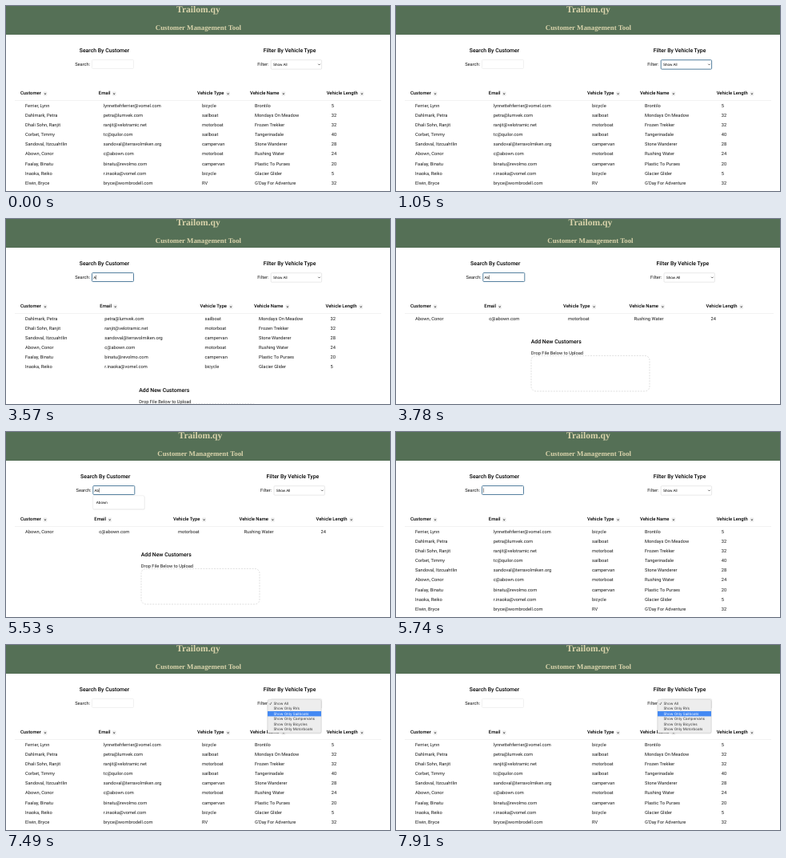
Animation, 480 px wide and 232 px high, one loop 8000 ms. Source, as an HTML page:

```html
<!DOCTYPE html>
<html lang="en">
<head>
<meta charset="utf-8">
<title>Customer Management Tool</title>
<style>
  html, body { margin: 0; width: 100%; height: 100%; overflow: hidden; background: #fff; }
  svg { display: block; width: 480px; height: 232px; }
  text { font-family: Roboto, sans-serif; font-size: 5.72px; fill: #1a1a1a; text-rendering: geometricPrecision; white-space: pre; }
  .serif { font-family: "Liberation Serif", serif; font-weight: 700; fill: #d9d3ab; text-anchor: middle; }
  .brand { font-size: 11.55px; }
  .tagline { font-size: 8.84px; }
  .head { font-size: 6.86px; font-weight: 500; fill: #000; }
  .col { font-size: 5.9px; font-weight: 500; fill: #000; }
  .ui { font-family: "Liberation Sans", sans-serif; font-size: 4.6px; fill: #000; }
  .menu { font-family: Inter, sans-serif; font-size: 4.55px; fill: #333; }
  .menu.on { fill: #fff; }
</style>
</head>
<body>
<svg id="stage" viewBox="0 0 480 232" xmlns="http://www.w3.org/2000/svg"></svg>
<script>
const LOOP = 8000;
const RING = 'stroke="#55809f" stroke-width="1"';
const stage = document.getElementById('stage');

const customers = [
  ['Ferrier, Lynn', 'lynnettehferrier@vomel.com', 'bicycle', 'Brontilo', 5],
  ['Dahlmark, Petra', 'petra@lumvek.com', 'sailboat', 'Mondays On Meadow', 32],
  ['Dhali Sohn, Ranjit', 'ranjit@velotramic.net', 'motorboat', 'Frozen Trekker', 32],
  ['Corbet, Timmy', 'tc@quilor.com', 'sailboat', 'Tangerinadale', 40],
  ['Sandoval, Itzcuahtlin', 'sandoval@terravolmiken.org', 'campervan', 'Stone Wanderer', 28],
  ['Abown, Conor', 'c@abown.com', 'motorboat', 'Rushing Water', 24],
  ['Faalay, Binatu', 'binatu@revolmo.com', 'campervan', 'Plastic To Purses', 20],
  ['Inaoka, Reiko', 'r.inaoka@vomel.com', 'bicycle', 'Glacier Glider', 5],
  ['Elwin, Bryce', 'bryce@wombrodell.com', 'RV', "G'Day For Adventure", 32]
];
const titles = ['Customer', 'Email', 'Vehicle Type', 'Vehicle Name', 'Vehicle Length'];
const sortX = [31, 19.4, 38.6, 41.9, 44.2];
const options = ['Show All', 'Show Only RVs', 'Show Only Sailboats',
  'Show Only Campervans', 'Show Only Bicycles', 'Show Only Motorboats'];

// Column positions widen or shrink with the longest visible entries
const layouts = {
  full: [18, 115.8, 239, 305, 400.7],
  some: [18, 117.3, 242.5, 310, 399.5],
  one: [18, 110.3, 209, 291.5, 387.5]
};

// Each entry holds from its time on
const typed = [[0, ''], [3570, 'A'], [3780, 'Ab'], [4060, 'Abo'], [4130, 'Abow'],
  [5180, 'Abo'], [5530, 'Ab'], [5600, '']];
const caret = [[0, 0], [2870, 1], [3360, 0], [3570, 1], [4690, 0], [5180, 1],
  [5600, 0], [5740, 1], [6230, 0], [6790, 1], [7000, 0]];
const picked = [[0, -1], [7070, 1], [7490, 2], [7840, -1], [7910, 2]];

const at = (track, t) => track.filter(k => k[0] <= t).pop()[1];
const within = (t, a, b) => t >= a && t < b;
const text = (x, y, s, cls = '') => `<text x="${x}" y="${y}" class="${cls}">${s}</text>`;
const rect = (x, y, w, h, fill, more = '') =>
  `<rect x="${x}" y="${y}" width="${w}" height="${h}" fill="${fill}" ${more}/>`;
const path = (d, stroke, width) =>
  `<path d="${d}" fill="none" stroke="${stroke}" stroke-width="${width}"/>`;

const ruler = document.createElement('canvas').getContext('2d');
ruler.font = '46px "Liberation Sans", sans-serif';
const widthOf = s => ruler.measureText(s).width / 10;

function header(dx) {
  return rect(0, 0, 480, 36, '#557056') +
    text(240.4 + dx, 8.3, 'Trailom.qy', 'serif brand') +
    text(240.4 + dx, 29.6, 'Customer Management Tool', 'serif tagline');
}

function search(dx, s) {
  const x = 107.5 + dx;
  const edge = s.focus ? RING : 'stroke="#e2e2e2" stroke-width=".5"';
  let out = text(91.8 + dx, 58.4, 'Search By Customer', 'head') +
    text(86.2 + dx, 74.6, 'Search:') +
    rect(x, 67.5, 52, 11, '#fff', `rx="1" ${edge}`) +
    text(x + 1.7, 74.9, s.query, 'ui');
  if (s.caret) out += rect(x + 1.7 + widthOf(s.query), 70.4, .5, 5.4, '#222');
  return out;
}

function filter(dx, s) {
  const edge = s.ring ? RING : 'stroke="#c8c8c8" stroke-width=".4"';
  return text(321.8 + dx, 58.4, 'Filter By Vehicle Type', 'head') +
    text(314.2 + dx, 74.6, 'Filter:') +
    rect(331.2 + dx, 67.7, 63.4, 11.5, '#fff', `rx="1" ${edge}`) +
    text(333.9 + dx, 75.1, options[0], 'ui') +
    path(`M${390.3 + dx} 72.7l1.2 1.3l1.2 -1.3`, '#222', .7);
}

function table(xs, rows, right) {
  let out = '';
  titles.forEach((title, i) => {
    const x = xs[i] + sortX[i];
    out += text(xs[i], 111.2, title, 'col') +
      rect(x - 2.4, 107.3, 4.8, 5.5, '#efefef', 'rx="1"') +
      path(`M${x - .9} 109.2l.9 1.9l.9 -1.9`, '#222', .6);
  });
  out += rect(11, 118.1, right - 11, .4, '#ddd');
  rows.forEach((row, r) => {
    row.forEach((cell, i) => { out += text(xs[i] + 6, 126.8 + r * 12.13, cell); });
  });
  return out;
}

function upload(x, y) {
  return text(x, y, 'Add New Customers', 'head') +
    text(x, y + 14.3, 'Drop File Below to Upload') +
    rect(x + .2, y + 15.4, 148, 44.6, 'none',
      'rx="6" stroke="#d2d2d2" stroke-width=".7" stroke-dasharray="2 1.4"');
}

function suggestion() {
  return rect(108.6, 80.6, 65, 17, '#000', 'rx="1.5" opacity=".08"') +
    rect(108.6, 79.8, 64.4, 17, '#fff', 'rx="1.5" stroke="#ddd" stroke-width=".4"') +
    text(112.8, 89.7, 'Abown', 'ui');
}

function menu(pick) {
  let out = rect(326.4, 69, 68.2, 42.5, '#000', 'rx="2.5" opacity=".1"') +
    rect(327, 68.3, 67, 42, '#ededed', 'rx="2" stroke="#c4c4c4" stroke-width=".4"');
  options.forEach((label, i) => {
    const y = 75 + i * 6.42;
    if (i === pick) out += rect(327, y - 4.8, 67, 6.4, '#4489f3');
    out += text(334.4, y, label, i === pick ? 'menu on' : 'menu');
  });
  return out + path('M329.4 73.6l1 1.2l1.6 -3', '#333', .6);
}

function stateAt(t) {
  return {
    query: at(typed, t),
    caret: at(caret, t),
    focus: within(t, 2870, 7000),
    ring: within(t, 1050, 2870),
    hint: within(t, 5250, 5600),
    menu: t >= 7070,
    pick: at(picked, t)
  };
}

function draw(s) {
  const q = s.query.toLowerCase();
  const rows = customers.filter(c => c[0].toLowerCase().includes(q));
  const short = rows.length === 1;
  const kind = short ? 'one' : q ? 'some' : 'full';
  // Without a scrollbar the page is a little wider
  let out = header(short ? 2.5 : 0) + search(short ? 1.3 : 0, s) + filter(short ? 3.8 : 0, s) +
    table(layouts[kind], rows, short ? 472 : 469);
  if (q) out += short ? upload(168.8, 156) : upload(166.3, 216.5);
  if (s.hint) out += suggestion();
  if (s.menu) out += menu(s.pick);
  return out;
}

let shown = '';
function tick() {
  const s = stateAt(performance.now() % LOOP);
  const key = JSON.stringify(s);
  if (key !== shown) {
    stage.innerHTML = draw(s);
    shown = key;
  }
  requestAnimationFrame(tick);
}
tick();
</script>
</body>
</html>
```
